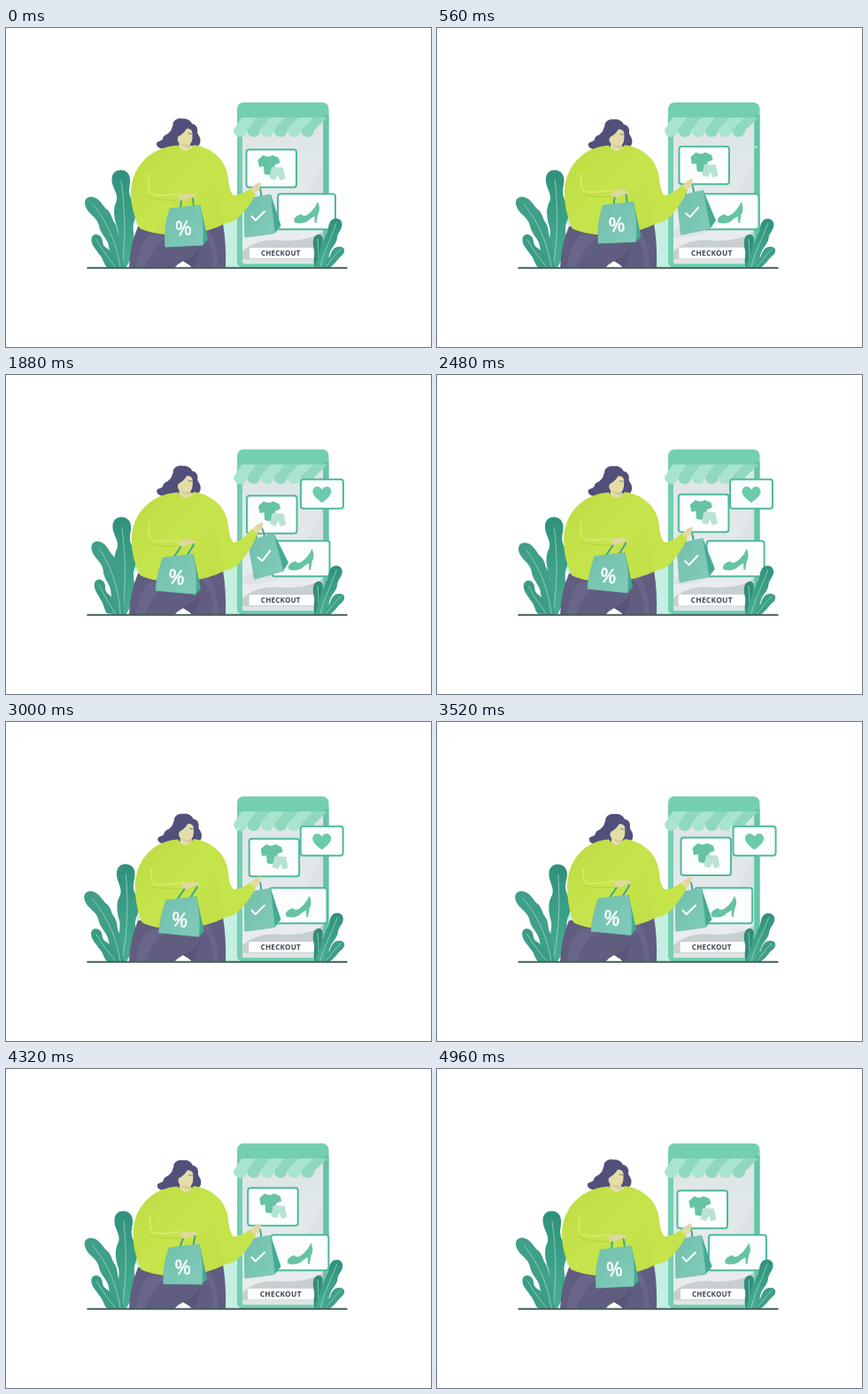
Write an HTML page that moves like this. It is 480 px wide and 360 px high and loops after 5000 ms.

```html
<!DOCTYPE html>
<html>
<head>
<meta charset="utf-8">
<style>
html, body { margin: 0; width: 100%; height: 100%; overflow: hidden; background: #fff; }
svg { display: block; width: 100vw; height: 100vh; }
text { font-family: "Noto Sans", "Open Sans", sans-serif; text-anchor: middle; }
.card { fill: #fcfefe; stroke: #4fb99c; stroke-width: 2; }
.vein { fill: none; stroke: #a9dccd; stroke-width: .7; stroke-linecap: round; }
.line { fill: none; stroke-linecap: round; stroke-linejoin: round; }
</style>
</head>
<body>
<svg viewBox="0 0 480 360">
  <defs>
    <linearGradient id="knit" x1="0" y1="0" x2="1" y2="1">
      <stop offset="0" stop-color="#bddb42"/><stop offset=".5" stop-color="#c6e44b"/><stop offset="1" stop-color="#c0df47"/>
    </linearGradient>
    <linearGradient id="glass" x1="0" y1="0" x2="0" y2="1">
      <stop offset="0" stop-color="#dce4e6"/><stop offset="1" stop-color="#e9eef0"/>
    </linearGradient>
    <linearGradient id="leaf" x1="0" y1="0" x2="0" y2="1">
      <stop offset="0" stop-color="#2f917c"/><stop offset="1" stop-color="#48ae92"/>
    </linearGradient>
    <linearGradient id="bag" x1="0" y1="0" x2="1" y2="1">
      <stop offset="0" stop-color="#70c0ac"/><stop offset="1" stop-color="#82cbba"/>
    </linearGradient>
    <clipPath id="screen"><rect x="267" y="103" width="91" height="163" rx="3"/></clipPath>
  </defs>

  <path fill="#c4efe1" d="M146 204Q150 196 165 200L240 214Q250 216 262 212V270H246L150 226Q143 214 146 204Z"/>

  <g id="phone">
    <rect x="261" y="84" width="103.5" height="187" rx="7" fill="#74cfb1"/>
    <path d="M359 98H364.500V264Q364 269 359 271Z" fill="#67c3a5"/>
    <g clip-path="url(#screen)">
      <rect x="267" y="99" width="91" height="167" fill="url(#glass)"/>
      <path d="M358 146Q346 192 304 212Q280 222 267 228V266H358Z" fill="#dde3e5"/>
      <path d="M267 236Q300 238 328 220Q350 206 358 188V266H267Z" fill="#e8ecee"/>
      <path d="M267 252Q285 236 315 240Q345 240 358 229V266H267Z" fill="#c8cfd1"/>
      <rect x="267" y="261" width="91" height="5" fill="#dfe5e7"/>
    </g>
    <g id="awning"></g>
  </g>
  <g id="pay">
    <rect x="275" y="248" width="74" height="12" rx="1.500" fill="#fff"/>
    <text x="310.300" y="256.900" font-size="8" font-weight="700" letter-spacing=".2" fill="#3f4a56">CHECKOUT</text>
  </g>

  <g id="wear">
    <rect class="card" x="271.500" y="137.200" width="56.500" height="42.500" rx="3"/>
    <path fill="#66c3a5" d="M290.500 143.500Q296 147 301 143.500L308 146.500L309.500 152L303.500 154.500L302.500 164.500Q296.500 167 291.500 164.500L291 156L286 157L284.500 149Z"/>
    <path fill="#b7e3d6" d="M300 157L313 157.500L315.500 170L309.500 172L307 165.500L304 171.500L297.500 169.500Z"/>
  </g>
  <g id="shoe">
    <rect class="card" x="307" y="187.300" width="65" height="40" rx="3"/>
    <path fill="#66c3a5" d="M352 196Q356 204 352 211L350.500 220H348.700L348.500 212.500Q343 215 340 218.500Q333 222 326 219.500Q324 216 328 212.500L333 210Q337 214 342 209.500Q349 204 352 196Z"/>
  </g>
  <g id="like">
    <rect class="card" x="-24" y="-16.500" width="48" height="33" rx="3"/>
    <path fill="#6bcbac" d="M0 10C-5 6-10.500 2-10.500-3C-10.500-9-3-10.500 0-5C3-10.500 10.500-9 10.500-3C10.500 2 5 6 0 10Z"/>
  </g>

  <g id="plant">
    <g id="tall">
      <path fill="url(#leaf)" d="M126 270C122 255 128 238 126 226C122 215 120 205 125 195C127 186 119 180 119.500 170C120 157 139 157 140 170C141 178 137 182 141 192C147 202 148 210 144 221C142 230 148 240 143 252C141 262 138 266 136 270Z"/>
      <path class="vein" d="M130 172C134 200 136 235 131 270"/>
    </g>
    <g id="side">
      <path fill="#3f9f88" d="M127 270C122 262 117 255 116 246C115 238 106 232 105 223C103 214 95 211 91 204C86 195 91 189 99 191C106 193 109 200 113 204C119 208 119 214 122 219C127 225 125 232 128 238C132 246 131 258 133 270Z"/>
      <path class="vein" d="M98 199C111 214 125 240 129 270"/>
    </g>
    <g id="low">
      <path fill="#3b9c86" d="M128 270H114C110 266 110 260 105 255C102 250 96 245 96.500 238C97 232 105 231 108 237C110 242 108 244 113 248C120 252 121 258 125 262Z"/>
      <path class="vein" d="M102 239C108 250 116 260 124 270"/>
    </g>
  </g>

  <path fill="#605d80" d="M149 224L245 220Q249 245 248 271H211Q206 266 200 263Q194 266 190 271H139Q140 245 149 224Z"/>
  <path fill="#69668a" d="M160 235Q176 230 180 238Q166 246 157 271H147Q148 250 160 235ZM228 226Q240 245 240 271H233Q237 250 221 230Z"/>
  <path fill="#58557a" d="M200 263Q214 258 219 245Q218 260 211 271Q206 266 200 263Z"/>

  <g id="head">
    <path fill="#50507b" d="M188.500 110C188 104 195 101 199 102.500C204 101 209 105 210 108C215 109 217 113 216 118C217 121 220 123 219.500 128C219 133 216 134 212 133L194 135C188 137 184 134 180 135.500C176 137 170 135 170 131C170 127 176 128 177 125C178 120 182 121 184 118C187 116 187 113 188.500 110Z"/>
    <path fill="#e4dda8" d="M195 122C198 121 202 117 204 113.500Q211 113 210.500 120Q211 128 208 131L209.500 143H194L195.500 130Q192 125 195 122Z"/>
    <path fill="#d4cc98" d="M196 130Q202 133 208 131L209 135Q201 136 196 130Z"/>
    <path class="line" stroke="#50507b" stroke-width=".7" d="M206 119L209.500 119.500"/>
  </g>

  <path id="torso" fill="url(#knit)"/>
  <path id="fold" class="line" stroke="#d3ea68" stroke-width="2"/>
  <path id="crease" class="line" stroke="#b6d33f" stroke-width="1"/>

  <g id="bagR">
    <path class="line" stroke="#44a48b" stroke-width="2" d="M279 196Q278 180 284 178Q288 178 288.500 194"/>
    <path fill="#43aa93" stroke="#43aa93" stroke-linejoin="round" d="M298.500 188L310 223L303 231.500Z"/>
    <path fill="url(#bag)" stroke="#74c2af" stroke-linejoin="round" d="M269 193L298.500 188L303.500 231.500L270 236Z"/>
    <path class="line" stroke="#fff" stroke-width="2" d="M277.500 212.500L281.700 217L292 207"/>
  </g>
  <path id="sleeve" fill="#c5e34a"/>
  <g id="handR">
    <path fill="#e6d9a7" d="M276.500 184Q277 179 281 177L286.500 174Q289 175 287 178.500Q287 184 281 187Z"/>
    <path class="line" stroke="#d5c691" stroke-width=".7" d="M281 180L286 177.500"/>
  </g>

  <g id="bagL">
    <path id="strap" class="line" stroke="#44a48b" stroke-width="2"/>
    <path id="gusset" fill="#43aa93" stroke="#43aa93" stroke-linejoin="round"/>
    <path id="front" fill="url(#bag)" stroke="#74c2af" stroke-linejoin="round"/>
    <text id="percent" y="8.200" font-size="22.500" fill="#fff" stroke="#fff" stroke-width=".5">%</text>
  </g>
  <path id="handL" fill="#e0d7a0" d="M194 190Q199 185.500 207 186.500Q213 187 214 190Q210 192 206 191.500Q202 196 195 194Z"/>

  <g id="bush">
    <path fill="#318d79" d="M349 270C346 262 349 258 348 251C346 243 346 235 352 233C358 232 359 238 357 244C360 252 357 260 358 270Z"/>
    <path class="vein" d="M352 238C353 250 353 260 353 270"/>
    <path fill="#3f9f88" d="M356 270C359 262 364 262 366 257C368 250 372 246 378 247C384 248 383 254 379 257C375 260 373 265 366 270Z"/>
    <path class="vein" d="M378 250C371 256 366 264 361 270"/>
    <g id="bushTall">
      <path fill="url(#leaf)" d="M350 270C350 262 354 258 355 251C355 244 360 240 361 234C365 229 363 224 366 219C369 213 379 214 379.500 221C380 227 375 230 374 236C374 243 368 247 366 253C364 260 361 265 359 270Z"/>
      <path class="vein" d="M373 220C367 238 358 254 355 270"/>
    </g>
  </g>

  <path d="M91.500 270.700H385.500" stroke="#3f5f57" stroke-width="1.900"/>
</svg>
<script>
const LOOP = 5000;
const $ = id => document.getElementById(id);
const set = (id, name, value) => $(id).setAttribute(name, value);
const move = (id, value) => set(id, "transform", value);
const wave = u => (1 - Math.cos(Math.PI * u)) / 2;

// Smooth value through [time, value] keys
function track(t, keys) {
  for (let i = 1; i < keys.length; i++) {
    const [t0, v0] = keys[i - 1], [t1, v1] = keys[i];
    if (t <= t1) return v0 + (v1 - v0) * wave((t - t0) / (t1 - t0));
  }
  return keys[keys.length - 1][1];
}

const SWAY = [[0, 0], [1100, .95], [1950, .12], [3500, 1], [LOOP, 0]];
const SLIDE = [[0, 0], [1100, -16.5], [2350, -2], [3600, -16], [LOOP, 0]];
const LIFT = [[0, 0], [1100, 1], [1850, 1], [2950, 0], [LOOP, 0]];
const SWING = [[0, 0], [300, 0], [2100, 1], [3400, 1], [LOOP, 0]];
const BEND = [[0, 0], [1000, 0], [1800, 8.5], [3100, -1], [LOOP, 0]];
const POP = [[0, 0], [500, 0], [900, 1], [3700, 1], [4100, 0], [LOOP, 0]];
const DRIFT = [[0, 360], [1120, 360], [2450, 355], [3600, 358.6], [LOOP, 358.6]];

function buildAwning() {
  const step = 15.2;
  let parts = "";
  for (let i = 0; i < 6; i++) {
    const x = 257 + i * step, top = 266 + i * 16.2;
    const fill = i % 2 ? "#90d8bd" : "#a8e4ce";
    parts += `<path fill="${fill}" d="M${top} 101H${top + 16.2}L${x + step} 115A7.600 8 0 0 1 ${x} 115Z"/>`;
  }
  $("awning").innerHTML = parts;
}

function drawBody(a, b) {
  const l = 6 * a, hx = 2 * b, hy = -8 * b;
  set("torso", "d", `M194 132.500Q203 145 212 132Q236 135 246 156Q251 170 251 184L249 220
    Q230 230 200 234Q168 234 ${151 + l / 2} 226Q${141 + l} 206 ${141 + l} 187
    C${141 + l} 156 ${164 + l / 2} 134 194 132.500Z`);
  set("fold", "d", `M${162 + l / 2} 165Q${158 + l} 180 ${164 + l} ${187 - 5 * a}Q${172 + l} ${190 - 7 * a} ${196 + l} ${187 - 8 * a}`);
  set("crease", "d", `M${160 + l} ${190 - 5 * a}Q${174 + l} ${196 - 8 * a} ${196 + l} ${194 - 8 * a}M240 158Q246 175 243 198`);
  set("sleeve", "d", `M236 142Q249 152 251 170Q252 184 257 189Q267 188 ${276 + hx} ${181 + hy}L${282 + hx} ${187 + hy}
    Q${274 + hx} ${204 + hy / 2} 260 216Q252 221 245 220Q238 190 236 142Z`);
}

// The lower left corner lags behind as the bag swings
function drawBag(s) {
  const p = (x, y) => `${x - 9 * s} ${y + 3.5 * s}`;
  const low = `${180 - 12 * s} ${247 - 3 * s}`;
  set("strap", "d", `M${p(197, 204)}L198 193Q198 188 204 188Q210 188 211 193L${p(212, 202)}`);
  set("gusset", "d", `M${p(219, 200)}L${p(227.500, 239)}L${p(221, 245.500)}Z`);
  set("front", "d", `M${p(185, 204)}Q${p(203, 202)} ${p(219, 200)}Q${p(224, 222)} ${p(222, 245)}L${low}Q${p(178, 224)} ${p(185, 204)}Z`);
  move("percent", `translate(${p(200.500, 225.500)}) rotate(${10 * s - 3})`);
}

function draw(t) {
  const a = track(t, SWAY), b = track(t, LIFT), bend = track(t, BEND);
  const beat = 1 + .06 * wave(6 * t / LOOP);

  move("wear", `translate(${4 * a} ${-6.8 * a})`);
  move("shoe", `translate(${track(t, SLIDE)} 0)`);
  move("like", `translate(${track(t, DRIFT)} 134.300) scale(${track(t, POP)})`);
  move("pay", `translate(311.500 254) scale(${beat}) translate(-311.500 -254)`);

  move("head", `translate(${1.8 * a} ${1.6 * a})`);
  drawBody(a, b);
  const hand = `translate(${6 * a} ${-8 * a})`;
  move("handL", hand);
  move("bagL", hand);
  drawBag(track(t, SWING));
  move("handR", `translate(${2.5 * b} ${-8 * b})`);
  move("bagR", `translate(${2.3 * b} ${-7.3 * b}) rotate(${-8.5 * b} 285 180)`);

  move("tall", `rotate(${4 * a} 131 270)`);
  move("side", `rotate(${5.5 * bend / 8} 129 270)`);
  move("low", `rotate(${.7 * bend} 124 270)`);
  move("bushTall", `rotate(${2 * a} 355 270)`);
}

function tick(now) {
  draw(now % LOOP);
  requestAnimationFrame(tick);
}

buildAwning();
draw(0);
requestAnimationFrame(tick);
</script>
</body>
</html>
```
